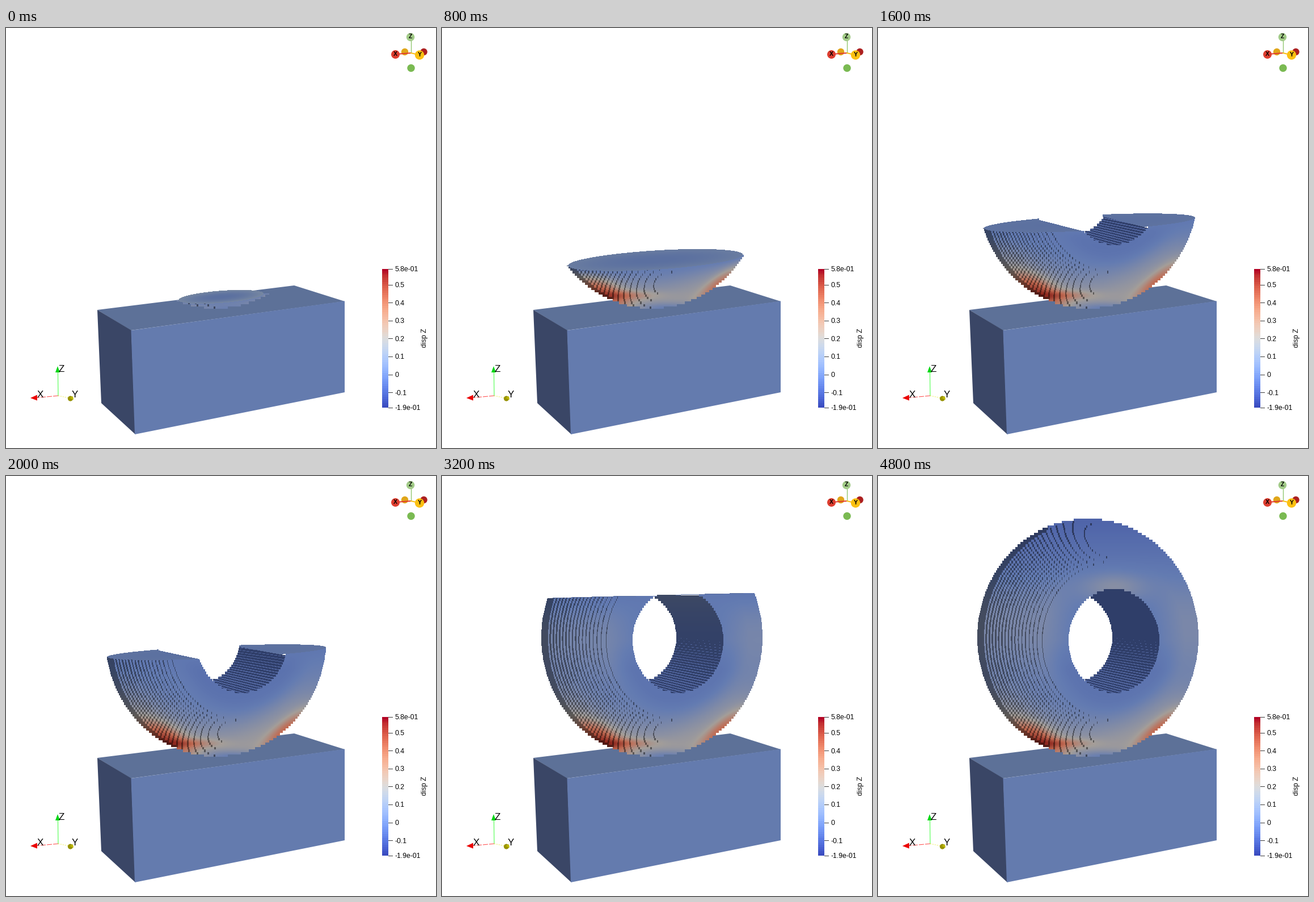
A matplotlib script for the animation above (5 s loop, 758 by 739 pixels).

```python
import numpy as np
import matplotlib.pyplot as plt
from matplotlib.animation import FuncAnimation
from matplotlib.colors import LinearSegmentedColormap
from matplotlib.patches import Circle, Polygon
from matplotlib.path import Path

W, H, DPI = 758, 739, 100
FRAMES, INTERVAL = 25, 200
LAYER = 4.15          # height of one printed layer in pixels
EYE = 205             # screen height of the camera's eye level
STEPS = 17            # depth steps on the rounded flank

fig = plt.figure(figsize=(W / DPI, H / DPI), dpi=DPI, facecolor="white")
ax = fig.add_axes([0, 0, 1, 1])
ax.axis("off")


def rgb(*c):
    return tuple(v / 255 for v in c)


def poly(points, color, z=1):
    ax.add_patch(Polygon(points, closed=True, fc=color, ec="none", zorder=z))


def dot(x, y, r, color, z=3):
    ax.add_patch(Circle((x, y), r, fc=color, ec="none", zorder=z))


def line(x0, y0, x1, y1, color, width=1, z=2, style="-"):
    ax.plot([x0, x1], [y0, y1], color=color, lw=width * 0.72, zorder=z, ls=style)


def label(x, y, s, px, **kw):
    kw = {"ha": "center", "va": "center", "color": "black", **kw}
    ax.text(x, y, s, fontsize=px * 0.72, family="Liberation Sans", zorder=6, **kw)


def draw_box():
    poly([(161, 496), (508, 453), (597, 481), (220, 532)], rgb(93, 113, 152))
    poly([(161, 496), (221, 532), (228, 715), (168, 660)], rgb(58, 70, 102))
    poly([(220.5, 532), (597, 480.5), (597, 641), (227, 715)], rgb(100, 123, 174))


def draw_colorbar():
    bands = np.linspace(1, 0, 64)[:, None]
    ax.imshow(bands, cmap="coolwarm", extent=(663, 674, 668, 424), aspect="auto",
              interpolation="nearest", zorder=2)
    names = ["5.8e-01", "0.5", "0.4", "0.3", "0.2", "0.1", "0", "-0.1", "-1.9e-01"]
    heights = [424] + [451.5 + 31.6 * i for i in range(7)] + [668]
    for name, y in zip(names, heights):
        line(674, y, 681, y, rgb(60, 60, 60))
        label(685, y, name, 12.3, ha="left", va="center_baseline")
    label(738, 545, "disp Z", 12.3, rotation=90)


def draw_axes_marker():
    line(92, 647, 91.5, 604, rgb(60, 255, 60))
    poly([(91, 595), (87, 606), (95, 606)], rgb(0, 215, 20), 3)
    line(92, 647, 55, 650.5, rgb(255, 70, 70), style=(0, (9, 2)))
    poly([(43, 651), (55, 645.5), (55, 655.5)], rgb(235, 5, 5), 3)
    line(92, 647, 111, 651, rgb(240, 240, 90), style=(0, (2, 2)))
    dot(113.5, 652, 4.6, rgb(150, 145, 0))
    poly([(112, 651), (118, 648), (119, 654)], rgb(190, 185, 0), 4)
    label(60.5, 645, "X", 17)
    label(98, 600.5, "Z", 17)
    label(121, 645.5, "Y", 17)


def draw_camera_widget():
    dot(736.5, 42, 6.2, rgb(172, 32, 32))
    dot(703, 42, 6.2, rgb(224, 166, 26))
    dot(714, 70.5, 6.7, rgb(122, 186, 82))
    line(713.5, 44, 713.5, 18, rgb(140, 195, 105), 1.3, 3)
    line(714, 44, 688, 46, rgb(225, 60, 45), 2, 3)
    line(714, 44, 727, 47, rgb(250, 190, 20), 2, 3)
    dot(713, 16, 7.2, rgb(162, 203, 136), 4)
    dot(686.5, 46.5, 7.5, rgb(222, 62, 48), 4)
    dot(729, 47.5, 8.2, rgb(252, 192, 18), 4)
    for name, x, y in (("Z", 713, 15.5), ("X", 686.5, 46), ("Y", 729, 47)):
        label(x, y, name, 10.5, weight="bold")


heat_map = LinearSegmentedColormap.from_list("lit", [
    rgb(68, 88, 165), rgb(100, 124, 178), rgb(164, 158, 153),
    rgb(192, 108, 84), rgb(138, 34, 26)])

X, Y = np.meshgrid(np.arange(W) + 0.5, np.arange(H) + 0.5)
YQ = (np.floor(Y / LAYER) + 0.5) * LAYER


def ellipse(cx, cy, rx, ry, x=X, y=YQ):
    return ((x - cx) / rx) ** 2 + ((y - cy) / ry) ** 2


def blob(cx, cy, rx, ry, slope=0.0):
    """Gaussian spot whose long axis runs along the given slope."""
    a = np.arctan(slope)
    dx, dy = X - cx, Y - cy
    u = dx * np.cos(a) + dy * np.sin(a)
    v = dy * np.cos(a) - dx * np.sin(a)
    return np.exp(-(u / rx) ** 2 - (v / ry) ** 2)


OUTER = (370, 284, 195, 209)
FRONT = (416, 290, 80, 91)
BACK = (340, 284, 73, 80)
outer = ellipse(*OUTER) < 1
front_hole = ellipse(*FRONT) < 1
back_hole = ellipse(*BACK) < 1


def flank_shadow():
    """Left-facing sides of the depth steps between front face and equator."""
    shadow = np.zeros_like(X, bool)
    for u in np.linspace(0, 1, STEPS + 1):
        cx, cy, grow = 416 - 38 * u, 290 - 5 * u, u ** 0.8
        rx, ry = 126 + 65 * grow, 140 + 67 * grow
        width = 1.2 + 1.9 * u
        inside = ellipse(cx, cy, rx, ry) < 1
        shifted = ellipse(cx, cy, rx, ry, X + width) < 1
        shadow |= shifted & ~inside & (X < cx)
    return shadow | (~inside & (X < 300))


shadow = flank_shadow()
radius = np.sqrt(ellipse(*OUTER, y=Y))
ring = np.sqrt(ellipse(*FRONT, y=Y))

base_heat = (0.25
             + 0.22 * np.exp(-((radius - 0.97) / 0.25) ** 2) / (1 + np.exp((390 - Y) / 20))
             + 0.42 * blob(280, 463, 52, 22, 0.55)
             + 0.20 * blob(325, 470, 50, 8)
             + 0.30 * blob(492, 447, 50, 13, -0.85)
             - 0.20 * blob(395, 494, 60, 11)
             - 0.06 * np.exp(-((ring - 1.1) / 0.3) ** 2) * np.clip((Y - 290) / 50, 0, 1))
side_heat = 0.11 * np.exp(-((Y - 255) / 95) ** 2) * np.clip((ring - 0.9) * 1.5, 0, 1)
arch_heat = 0.17 * blob(416, 196, 55, 26)

# Treads in the bore fan out; the lower they lie, the more of their tops is seen.
fan = 0.0019 * (X - 390)
level = (Y + 228 * fan) / (1 + fan)
tread_top = level / LAYER % 1 < np.clip((level - 280) / 150, 0, 0.5)
WALL_DARK, WALL_TOP, WALL_GREY = (np.array(rgb(*c)) for c in
                                  ((47, 62, 105), (80, 100, 156), (68, 78, 98)))


def chord(shape, y, slope):
    """Left and right points where a cut at height y meets an ellipse."""
    cx, cy, rx, ry = shape
    h = 1 - ((y - cy) / ry) ** 2
    if h <= 0:
        return None
    half = rx * np.sqrt(h)
    return [(cx + s * half, y + slope * s * half) for s in (-1, 1)]


def along(a, b):
    """Height of the line through two points at every pixel column."""
    return a[1] + (b[1] - a[1]) / (b[0] - a[0]) * (X - a[0])


def render(k):
    cut = 473 - 16.1 * k - 0.02 * k * k
    slope = -0.075 * (1 - k / 24)
    below_eye = max(cut - EYE, 0)
    mid = 370 + 9 * max(1 - k / 12, 0)
    half = 195 * np.sqrt(max(1 - ((cut + 4 - 284) / 209) ** 2, 0.01))
    thick = 0.105 * below_eye * half / 195

    axis = cut + slope * (X - mid)
    bulge = thick * np.sqrt(np.clip(1 - ((X - mid) / half) ** 2, 0, 1))
    depth = Y - axis - bulge
    body = outer & (depth > 0) & ~front_hole
    top = (np.abs(Y - axis) < bulge) & (np.abs(X - mid) < half) & ~body

    wall = front_hole & ~back_hole
    far = chord(BACK, cut - 0.059 * below_eye, slope)
    near = chord(FRONT, cut + 0.8 * thick, slope)
    if far and near:
        (bl, br), (fl, fr) = far, near
        gap = Path([(bl[0], bl[1] - 30), (br[0], br[1] - 30), br, fr, fl, bl])
        opened = gap.contains_points(np.c_[X.ravel(), Y.ravel()]).reshape(X.shape)
        top &= ~opened & ~(front_hole & (Y > along(fl, fr)))
        wall &= Y > along(br, fr)
    elif cut > 290:
        wall[:] = False

    # Fresh layers are cool; the closing cap keeps a deeper cool zone.
    cap = np.clip((k - 20) / 4, 0, 1)
    d = np.clip(depth, 0, None)
    heat = (0.28 + (base_heat - 0.28) * (1 - np.exp(-d / 15))
            + side_heat * (1 - np.exp(-d / 50))
            + arch_heat * (1 - np.exp(-d / 30))
            - (0.06 * min(1, k / 10) + 0.13 * cap) * np.exp(-d / (35 + 45 * cap)))
    image = np.zeros((H, W, 4))
    image[body, :3] = heat_map(np.clip(heat[body], 0, 1))[:, :3]
    image[body & shadow, :3] *= 0.56

    r = np.clip(np.hypot((X - mid) / half, (Y - axis) / max(thick, 1)), 0, 1)[top, None]
    warm = max(0.15, 1 - k / 9)
    image[top, :3] = (np.array(rgb(91, 112, 160))
                      + r ** 2 * warm * np.array(rgb(28, 24, 2)))

    grey = (0.7 * np.exp(-np.clip(Y - cut, 0, None) / 60) * (11 < k < 19))[..., None]
    bore = WALL_DARK * (1 - grey) + WALL_GREY * grey
    bore = np.where(tread_top[..., None], WALL_TOP, bore)
    image[wall, :3] = bore[wall]
    image[..., 3] = body | top | wall
    return image


draw_box()
draw_colorbar()
draw_axes_marker()
draw_camera_widget()
part = ax.imshow(render(0), extent=(0, W, H, 0), interpolation="nearest", zorder=2)
ax.set_xlim(0, W)
ax.set_ylim(H, 0)
ax.set_aspect("auto")


def update(k):
    part.set_data(render(k))
    return (part,)


anim = FuncAnimation(fig, update, frames=FRAMES, interval=INTERVAL,
                     repeat=True, repeat_delay=0)
plt.show()
```
